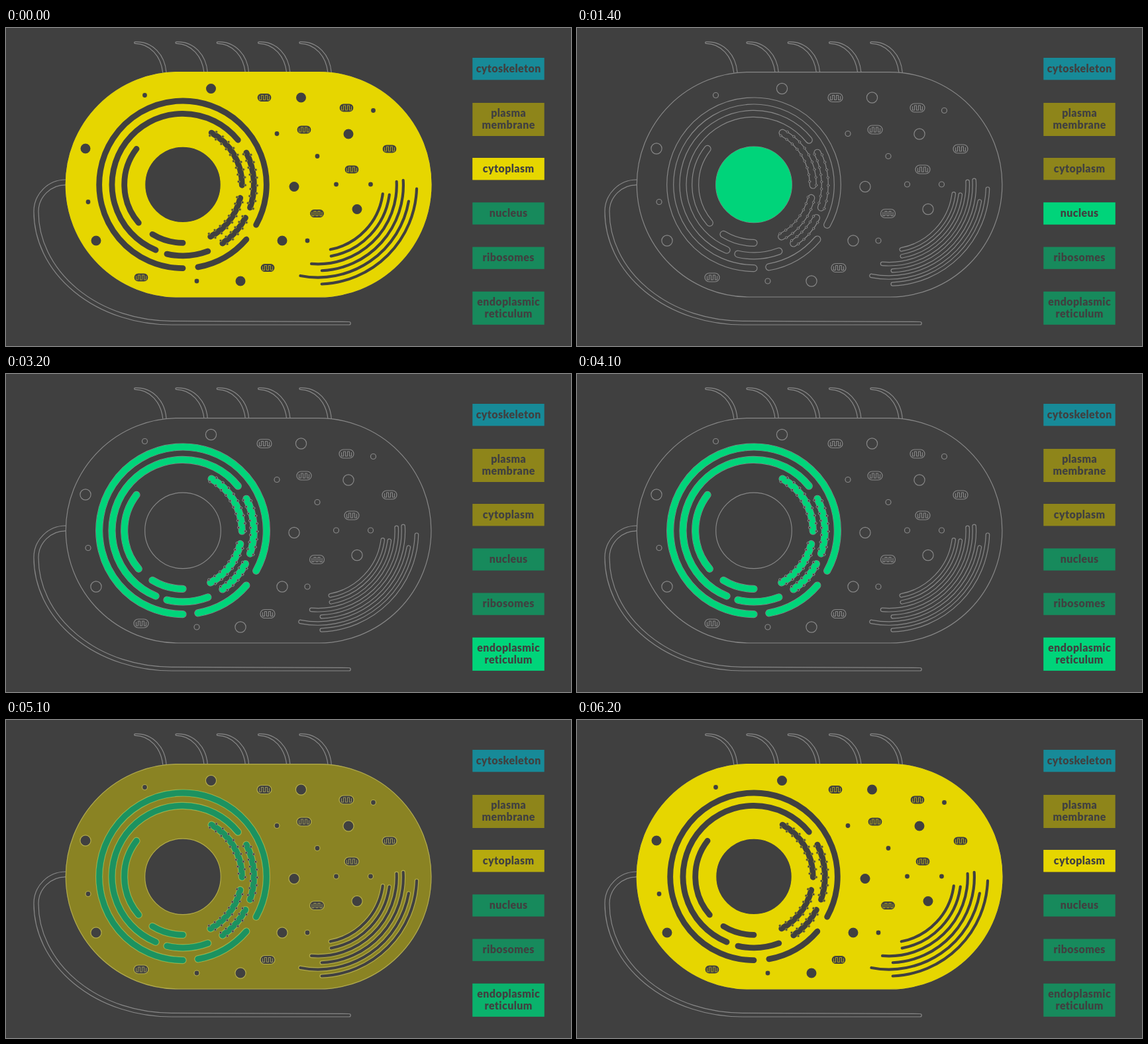
An HTML page for the animation above (6400 ms loop, 853 by 480 pixels).

```html
<!DOCTYPE html>
<html lang="en">
<head>
<meta charset="utf-8">
<title>Cell parts</title>
<style>
html, body { margin: 0; height: 100%; overflow: hidden; background: #404040; }
svg { display: block; width: 100vw; height: 100vh; }
path, circle, rect { fill: none; stroke-linecap: round; stroke-linejoin: round; }
.lines { --line: #878787; --fine: #878787; --body: #404040; }
.cyto { --line: #e6d600; --fine: #a39a24; --body: #e6d600; }
.cell { fill: var(--body); stroke: var(--line); stroke-width: 1.2; }
.hole { fill: #404040; stroke: var(--line); stroke-width: 1.2; }
.rim { stroke: var(--line); }
.core { stroke: #404040; }
.fine { stroke: var(--fine); stroke-width: 1.1; }
.dot { fill: #404040; stroke: var(--fine); stroke-width: .9; }
.er { --fine: #878787; }
.er path { stroke: #00d47a; stroke-width: 9.8; }
text { font: 900 16px Lato, "Open Sans", sans-serif; letter-spacing: .4px; text-anchor: middle; fill: #404040; }
</style>
</head>
<body>
<svg id="stage" viewBox="0 0 853 480" preserveAspectRatio="none"></svg>
<script>
const YELLOW = '#e6d600', GREEN = '#00d47a', DIM_YELLOW = '#8e851a', DIM_GREEN = '#178a5c';
const big = [[309.5, 91.5], [445.5, 105], [517, 160], [435, 239.5], [530, 273.5], [417, 321], [354, 382], [136, 321], [120, 182]];
const small = [[209.5, 101.5], [554.5, 124.5], [409, 159.5], [470, 193.5], [498.5, 236], [550.5, 236], [455, 321], [288, 382], [124, 262.5]];
const mitos = [[390, 105], [514, 120.5], [450, 153.5], [579, 182.5], [522, 213.5], [469.5, 280], [395, 362], [204, 376.5]];
// radius, start angle, end angle
const smooth = [[126.3, 90, 388.8], [107, 112.5, 321.1], [88.3, 139.1, 217.6], [88, 90, 121.5], [107.5, 69.4, 102.9], [126.6, 40.8, 79.6]];
const rough = [[89.3, -61.1, .6], [107.3, -26.6, 18.9], [89, 13.1, 62], [107, 28, 56]];
// start and end angle, from the inside out
const golgi = [[7.5, 79], [7.5, 79.5], [-2.7, 94.8], [-3.4, 87.4], [10, 101], [2, 87.8]];

const polar = (cx, cy, r, deg) => {
  const a = deg * Math.PI / 180;
  return [cx + r * Math.cos(a), cy + r * Math.sin(a)].map(v => v.toFixed(2));
};
const arc = (cx, cy, r, a, b) =>
  `M${polar(cx, cy, r, a)}A${r} ${r} 0 ${b - a > 180 ? 1 : 0} 1 ${polar(cx, cy, r, b)}`;
const circle = (x, y, r, cls = 'hole') => `<circle class="${cls}" cx="${x}" cy="${y}" r="${r}"/>`;
const tube = (d, w) =>
  `<path class="rim" d="${d}" stroke-width="${w + 1.2}"/><path class="core" d="${d}" stroke-width="${w - 1.2}"/>`;

const erArcs = [...smooth, ...rough].map(([r, a, b]) => arc(267, 236.3, r, a, b));
const golgiArcs = golgi.map(([a, b], i) => arc(471, 237.5, +(98.6 + 10.1 * i).toFixed(1), a, b));

// ribosomes alternate between the two edges of the rough strands
const ribosomes = rough.map(([r, a, b]) => {
  const n = Math.round((b - a) * Math.PI / 180 * r / 5.5);
  let out = '';
  for (let i = 0; i <= n; i++)
    out += circle(...polar(267, 236.3, r + (i % 2 ? 5 : -5), a + (b - a) * i / n), 1.7, 'dot');
  return out;
}).join('');

const mito = ([x, y]) => `<g transform="translate(${x} ${y})">
  <rect class="hole" x="-11" y="-6.5" width="22" height="13" rx="6.5"/>
  <path class="fine" d="M-7.5-2V3.5h3V-3.5h3V3.5h3V-3.5h3V3.5h3V-2"/></g>`;

const cell = () => `<rect class="cell" x="90.3" y="66.6" width="551.6" height="339.4" rx="169.7"/>`
  + big.map(p => circle(...p, 8.1)).join('')
  + small.map(p => circle(...p, 4)).join('')
  + mitos.map(mito).join('')
  + circle(267, 236.4, 57.3)
  + erArcs.map(d => tube(d, 10)).join('')
  + golgiArcs.map(d => tube(d, 5.4)).join('')
  + ribosomes;

let hairs = '';
for (let i = 0; i < 5; i++)
  hairs += `<path class="hole" transform="translate(${62.3 * i} 0)"
    d="M236.7 67C234 43 218 24 195 23.4a1.3 1.3 0 0 1 0-2.6C222 20 240 41 242 67"/>`;
const tail = `<path class="hole" d="M90 229A48 48 0 0 0 42 277A208 171 0 0 0 250 448L518 448
  a2.2 2.2 0 0 0 0-4.5L250 442.3A201 165.3 0 0 1 49 277A41 40.5 0 0 1 90 236.8"/>`;

// top, height, dim colour, bright colour, layer, lines of text
const labels = [
  [45, 33.3, '#178a98', '', '', 'cytoskeleton'],
  [113, 50, DIM_YELLOW, '', '', 'plasma', 'membrane'],
  [196, 33.3, DIM_YELLOW, YELLOW, 'cyto', 'cytoplasm'],
  [263.3, 33.3, DIM_GREEN, GREEN, 'nucleus', 'nucleus'],
  [330.5, 33.3, DIM_GREEN, '', '', 'ribosomes'],
  [397.8, 50, DIM_GREEN, GREEN, 'er', 'endoplasmic', 'reticulum']
];
const label = ([y, h, dim, bright, layer, ...words]) => {
  const box = (fill, attr = '') =>
    `<rect x="704.3" y="${y}" width="108.4" height="${h}" style="fill:${fill}" ${attr}/>`;
  const mid = y + h / 2 + 5.2;
  return box(dim) + (layer && box(bright, `data-layer="${layer}"`))
    + words.map((w, i) =>
      `<text x="758.7" y="${mid + (i - (words.length - 1) / 2) * 17.8}">${w}</text>`).join('');
};

const stage = document.getElementById('stage');
stage.innerHTML = `<g class="lines">${hairs}${tail}${cell()}</g>
  <g class="cyto" data-layer="cyto">${cell()}</g>
  <circle data-layer="nucleus" cx="267" cy="236.4" r="57.4" style="fill:${GREEN}"/>
  <g class="er" data-layer="er">${erArcs.map(d => `<path d="${d}"/>`).join('')}${ribosomes}</g>
  ${labels.map(label).join('')}`;

const layers = [...stage.querySelectorAll('[data-layer]')];
const LOOP = 6400, STEP = 100;
const ease = (t, start, length) => {
  const p = Math.min(1, Math.max(0, (t - start) / length));
  return p * p * (3 - 2 * p);
};

function draw(now) {
  const t = Math.floor(now % LOOP / STEP) * STEP;
  const a = ease(t, 75, 620), b = ease(t, 2175, 620), c = ease(t, 4840, 560);
  const level = { cyto: 1 - a + c, nucleus: a - b, er: b - c };
  for (const el of layers) el.setAttribute('opacity', level[el.dataset.layer]);
}

const begin = performance.now();
function tick() {
  draw(performance.now() - begin);
  requestAnimationFrame(tick);
}
tick();
</script>
</body>
</html>
```
